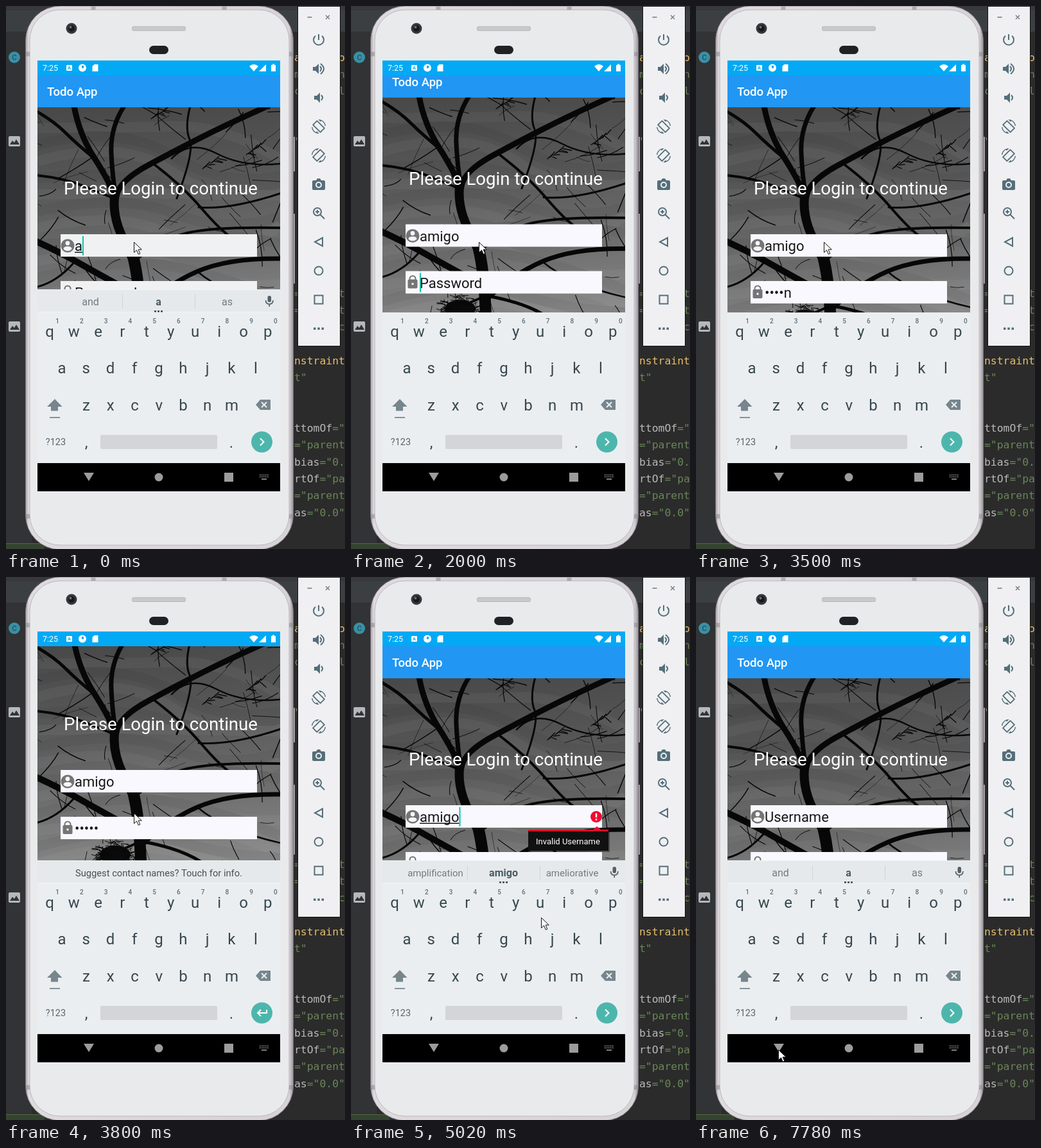
Animation of 528 by 847 pixels, one loop 8 s. Source, as an HTML page:

```html
<!DOCTYPE html>
<html lang="en">
<head>
<meta charset="utf-8">
<title>Todo App login</title>
<style>
html, body { margin: 0; width: 100%; height: 100%; overflow: hidden; background: #2b2b2b; }
svg { display: block; width: 528px; height: 847px; font-family: Roboto, sans-serif; }
text { white-space: pre; }
.mid { text-anchor: middle; }
.code { font: 16.4px "DejaVu Sans Mono", monospace; }
.line { fill: none; stroke: #546e7a; stroke-width: 2; }
.solid { fill: #546e7a; }
.twigs, .tree { fill: none; stroke: #070707; stroke-linecap: round; }
</style>
</head>
<body>
<svg viewBox="0 0 528 847">
  <defs>
    <linearGradient id="sky" x1="0" y1="0" x2="0.08" y2="1">
      <stop offset="0" stop-color="#484848"/><stop offset=".3" stop-color="#575757"/>
      <stop offset=".62" stop-color="#717171"/><stop offset="1" stop-color="#989898"/>
    </linearGradient>
    <linearGradient id="edge">
      <stop offset="0" stop-color="#a9a4a8"/><stop offset=".012" stop-color="#dedade"/>
      <stop offset=".985" stop-color="#d6d2d6"/><stop offset="1" stop-color="#969197"/>
    </linearGradient>
    <clipPath id="window"><rect x="49" y="107" width="378" height="371"/></clipPath>
    <clipPath id="photoClip"><rect x="49" y="158" width="378" height="430"/></clipPath>
  </defs>

  <g id="editor">
    <rect width="528" height="847" fill="#2b2b2b"/>
    <rect width="40" height="847" fill="#313335"/>
    <rect width="528" height="40" fill="#3c3f41"/>
    <rect width="528" height="7" fill="#37393b"/>
    <rect y="838" width="60" height="9" fill="#354431"/>
    <path d="M0 838.5H60" stroke="#52683f"/>
    <circle cx="13" cy="80" r="9" fill="#3a8fa5"/>
    <text x="13" y="84" class="mid" font-size="11" fill="#203c45">C</text>
    <g id="thumbs"></g>
    <g id="code" class="code"></g>
  </g>

  <g id="phone">
    <path d="M447 204h3v54h-3zM447 324h3v109h-3z" fill="#a5a1a6"/>
    <rect x="30.5" y="0" width="417" height="848" rx="54" fill="url(#edge)" stroke="#77737a"/>
    <rect x="37" y="6" width="404" height="835" rx="47" fill="#e9eaec" stroke="#bbb7bc"/>
    <path d="M31 75h6M441 75h6M31 796h6M441 796h6M136 1v5M340 1v5" stroke="#8d898e" stroke-width="7" opacity=".55"/>
    <circle cx="102" cy="35" r="8.5" fill="#36383b"/><circle cx="102" cy="35" r="5" fill="#17191c"/>
    <circle cx="100.500" cy="33" r="2" fill="#66717a"/>
    <rect x="196.500" y="32" width="83" height="6.500" rx="2" fill="#c8c9cb" stroke="#b9babc"/>
    <rect x="223" y="62" width="30" height="13" rx="6.500" fill="#202124"/>
  </g>

  <rect x="49" y="85" width="378" height="393" fill="#2196f3"/>
  <g clip-path="url(#window)">
    <g id="page">
      <g clip-path="url(#photoClip)">
        <rect x="49" y="158" width="378" height="430" fill="url(#sky)"/>
        <g id="clouds" fill="none" stroke-width="16" opacity=".04"></g>
        <g id="twigs" class="twigs"></g>
        <g id="tree" class="tree"></g>
        <ellipse cx="170" cy="488" rx="24" ry="14" fill="#0a0a0a"/>
        <g id="nest" class="twigs"></g>
      </g>
      <rect x="49" y="107" width="378" height="51" fill="#2196f3"/>
      <text x="64" y="140" font-size="18.600" font-weight="500" fill="#fff">Todo App</text>
      <text x="241" y="294" class="mid" font-size="27.600" fill="#fff">Please Login to continue</text>

      <rect class="field" x="85" y="356" width="306" height="35"/>
      <circle cx="96" cy="374" r="10.500" fill="#757575"/>
      <circle cx="96" cy="370" r="3.400" fill="#f6f6fa"/>
      <path d="M89.500 379q0-4 6.500-4t6.500 4q-2.500 3-6.500 3t-6.500-3z" fill="#f6f6fa"/>
      <text id="user" x="107" y="382" font-size="22" fill="#171717"></text>
      <rect id="underline" x="107" y="383.500" height="1.500" fill="#171717"/>

      <rect class="field" x="85" y="429" width="306" height="35"/>
      <path d="M91.500 443v-2a4.500 4.500 0 0 1 9 0v2" fill="none" stroke="#757575" stroke-width="2"/>
      <rect x="88.500" y="442" width="15" height="14" rx="2" fill="#757575"/>
      <circle cx="96" cy="449" r="1.800" fill="#f6f6fa"/>
      <text id="pass" x="107" y="455" font-size="22" fill="#171717"></text>
      <rect id="caret" width="2" height="30" fill="#0ac5ad"/>

      <rect x="174" y="515" width="129" height="34" rx="12" fill="#25543a" opacity=".7"/>
      <rect x="174" y="513" width="129" height="34" rx="12" fill="#40a562"/>
      <path d="M194 524v-3h16v19h-16v-3M188 530.500h14m-5-5l5 5-5 5" fill="none" stroke="#b9dfc5" stroke-width="2"/>
      <text x="253" y="535" class="mid" font-size="12.200" font-weight="500" letter-spacing="1.100" fill="#d9eee0">LOGIN</text>

      <g id="badge">
        <circle cx="382" cy="374" r="9" fill="#f30b2f"/>
        <path d="M382 368.500v6.500m0 2v2.500" stroke="#fff" stroke-width="2.500"/>
      </g>
      <g id="popup">
        <rect x="277" y="397" width="126" height="32" fill="#000" opacity=".35"/>
        <rect x="276" y="395" width="125" height="32" fill="#111"/>
        <path d="M276 394h101l6-5 6 5h12v2.500H276z" fill="#f30b2f"/>
        <text x="338" y="417" class="mid" font-size="13" fill="#fff">Invalid Username</text>
      </g>
    </g>
  </g>

  <g id="status" fill="#fff">
    <rect x="49" y="85" width="378" height="23" fill="#03a9f4"/>
    <text x="57" y="101" font-size="12.500">7:25</text>
    <rect x="94" y="92" width="9" height="9" rx="1"/>
    <path d="M96.500 99l2-5 2 5m-3.300-1.800h2.600" fill="none" stroke="#03a9f4"/>
    <circle cx="119" cy="96.500" r="6"/>
    <path d="M118 93h3v4h-3z" fill="#03a9f4"/>
    <path d="M137.500 91h6v11h-9v-8zM379 94q7-6 14 0l-7 8zM405 91v11h-11zM413 92h2v-1.500h3V92h2v10h-7z"/>
  </g>

  <g id="keyboard" fill="#37474f">
    <rect x="49" y="478" width="378" height="235" fill="#ebeef1"/>
    <g id="keys" class="mid" font-size="24"></g>
    <g fill="#77858d">
      <path d="M64 625l12-12 11.500 12H81v6.500H70V625zM68 641h16v1.800H68z"/>
      <path d="M396 614h15q1 0 1 1v14q0 1-1 1h-15l-7-8z"/>
    </g>
    <path d="M398 618l8 8m0-8l-8 8" stroke="#ebeef1" stroke-width="2"/>
    <text x="77.500" y="685" class="mid" font-size="14.500" fill="#56656d">?123</text>
    <rect x="147" y="669" width="182" height="22" rx="2" fill="#d3d5d7"/>
    <circle cx="398.500" cy="680" r="16.500" fill="#4db6ac"/>
    <path id="action" fill="none" stroke="#fff" stroke-width="2"/>
  </g>

  <g id="bar">
    <rect x="49" y="442" width="378" height="36" fill="#e6e9eb"/>
    <path d="M49 442.500h378M49 477.500h378" stroke="#f1f3f4"/>
    <g id="words" class="mid" fill="#6f7c83">
      <text x="131.500" y="467"></text>
      <text x="237.500" y="467" font-weight="700" fill="#455a64"></text>
      <text x="344.500" y="467"></text>
      <path d="M181.500 450v22M294.500 450v22" stroke="#d0d4d6"/>
      <path d="M231 475h3v2.500h-3zM236 475h3v2.500h-3zM241 475h3v2.500h-3z" fill="#37474f"/>
      <rect x="407.500" y="452" width="5.500" height="10" rx="2.700" fill="#546068"/>
      <path d="M404.500 459q0 6 5.700 6t5.700-6M410.200 465v4" fill="none" stroke="#546068" stroke-width="1.700"/>
    </g>
    <text id="hint" x="238" y="467" class="mid" font-size="14.700" fill="#455158">Suggest contact names? Touch for info.</text>
  </g>

  <g id="nav" fill="#9c9c9c">
    <rect x="49" y="713" width="378" height="44" fill="#000"/>
    <path d="M121 728h16l-8 13zM340 728h14v14h-14z"/>
    <circle cx="238" cy="735" r="6.500"/>
    <path d="M395 731.500h14M395 734.500h14" stroke="#aaa" stroke-width="1.500" stroke-dasharray="1.500 1.500"/>
    <path d="M398 738h8" stroke="#aaa" stroke-width="1.500"/>
  </g>

  <g id="tools">
    <rect x="454.500" y=".5" width="66" height="530" fill="#f0f0f2" stroke="#111"/>
    <path d="M469.500 17.500h7M498 14.500l6 6m0-6l-6 6" stroke="#6c777d" stroke-width="1.300"/>
  </g>
  <path id="pointer" d="M0 0V16L4 12.300 6.800 18.700 9.300 17.600 6.600 11.400H11.800z" fill="#fff" stroke="#111"/>
</svg>

<script>
const LOOP = 8000;
const $ = id => document.getElementById(id);
const add = (id, markup) => $(id).insertAdjacentHTML('beforeend', markup);

let seed = 41;
const random = (low, high) => {
  seed = (seed * 16807) % 2147483647;
  return low + (high - low) * seed / 2147483647;
};
const stroke = (d, width) => `<path d="${d}" stroke-width="${width}"/>`;

function drawEditor() {
  const green = '#6a8759', plain = '#bababa', yellow = '#e8bf6a';
  // row, colour, text, then an optional second colour and text
  const rows = [
    [0, yellow, 'a      o'], [1, green, 'm      n'], [2, green, 'c      l'],
    [5, green, '"'], [14, green, '=      t'], [15, green, '=      t'], [16, green, '       c'],
    [18, yellow, 'nstraint'], [19, green, 't"'], [22, plain, 'ttomOf', green, '="'],
    [23, green, '="parent'], [24, plain, 'bias', green, '="0.'],
    [25, plain, 'rtOf', green, '="pa'], [26, green, '="parent'], [27, plain, 'as', green, '="0.0"']
  ];
  for (const [row, color, text, nextColor, next = ''] of rows)
    add('code', `<text x="449" y="${85.5 + row * 26.3}" fill="${color}">${text}<tspan fill="${nextColor || color}">${next}</tspan></text>`);
  for (const y of [211, 500])
    add('thumbs', `<rect x="4" y="${y - 8}" width="18" height="16" rx="2" fill="#b5b9bc"/>
      <path d="M6 ${y + 5}l4-6 3 3 3-5 5 8z" fill="#313335"/>`);
}

function drawPhoto() {
  const limbs = [
    [9, 'M106 156Q114 200 137 236T168 294'],
    [7, 'M184 156Q162 190 164 230T171 294'],
    [9, 'M408 156Q350 182 310 202T222 248T172 298'],
    [14, 'M170 290Q164 325 182 362T203 410'],
    [18, 'M199 395Q207 430 209 478T220 590'],
    [10, 'M47 367Q82 383 112 400T206 452'],
    [5, 'M47 164Q75 180 93 198T138 238'],
    [4, 'M47 264Q90 268 124 282T168 300'],
    [3, 'M106 400Q80 430 49 438'],
    [7, 'M212 473Q250 435 298 414T428 394'],
    [4, 'M198 400Q240 364 282 354T428 346'],
    [4, 'M232 248Q274 280 304 315T350 360'],
    [3, 'M287 156Q278 190 286 208T266 300'],
    [2.5, 'M428 246Q370 252 328 230T258 238'],
    [3, 'M300 314Q350 318 428 292'],
    [5, 'M214 468Q270 478 305 500T350 565'],
    [4, 'M47 525Q100 515 135 500T204 470'],
    [2.5, 'M298 414Q340 450 428 470']
  ];
  for (const [width, d] of limbs) add('tree', stroke(d, width));

  for (let i = 0; i < 15; i++) {
    const y = 190 + i * 26;
    add('clouds', `<path d="M49 ${y}Q180 ${y - random(0, 40)} 260 ${y + random(-20, 25)}T427 ${y + random(-10, 50)}" stroke="${i % 2 ? '#000' : '#fff'}"/>`);
  }
  for (let i = 0; i < 90; i++) {
    const x = random(45, 430), y = random(150, 550);
    const angle = random(-2.9, 0.5), length = random(20, 65);
    const dx = Math.cos(angle) * length, dy = Math.sin(angle) * length;
    add('twigs', stroke(`M${x} ${y}q${dx / 2 + random(-6, 6)} ${dy / 2 + random(-5, 5)} ${dx} ${dy}`, random(0.4, 1.5)));
  }
  for (const [x, y] of [[240, 168], [388, 224], [320, 246]])
    for (let i = 0; i < 9; i++)
      add('twigs', stroke(`M${x - 14 + i * 3} ${y + 8 - i * 2}l${random(4, 14)} ${random(-10, 9)}`, 1.3));
  for (let i = 0; i < 130; i++) {
    const angle = random(0, 2 * Math.PI), reach = random(0.4, 1);
    const x = 170 + 34 * reach * Math.cos(angle), y = 487 + 21 * reach * Math.sin(angle);
    add('nest', stroke(`M${x} ${y}l${random(-13, 13)} ${random(-8, 8)}`, 1));
  }
}

function drawKeys() {
  const pitch = 37.75;
  [['qwertyuiop', 68, 515.5], ['asdfghjkl', 87, 573], ['zxcvbnm', 125, 631], [',', 125, 689], ['.', 351, 689]]
    .forEach(([letters, x, y]) => [...letters].forEach((letter, i) =>
      add('keys', `<text x="${x + i * pitch}" y="${y}">${letter}</text>`)));
  [...'1234567890'].forEach((digit, i) =>
    add('keys', `<text x="${80 + i * pitch}" y="495" font-size="10" font-weight="500" fill="#606e76">${digit}</text>`));
}

function drawTools() {
  const speaker = '<path class="solid" d="M-9-3h4l5-5v16l-5-5h-4z"/>';
  const rotate = `<g transform="translate(-11 -11) scale(.92)">
    <path class="line" d="M9.200 2.300L21.700 14.800 14.800 21.700 2.300 9.200z" stroke-linejoin="round"/>
    <path class="solid" d="M16.500 2.500c3.300 1.600 5.600 4.700 6 8.500H24C23.400 4.800 18.300 0 12 0h-.7l3.800 3.800zM7.500 21.500C4.200 20 1.900 16.800 1.500 13H0c.6 6.200 5.700 11 12 11h.7l-3.800-3.800z"/></g>`;
  const icons = [
    '<path class="line" d="M-5-6.500A8 8 0 1 0 5-6.500M0-9V0" stroke-width="2.500"/>',
    speaker + '<path class="line" d="M2-4Q6 0 2 4M3-8Q13 0 3 8"/>',
    `<g transform="translate(2)">${speaker}<path class="line" d="M2-4Q6 0 2 4"/></g>`,
    rotate,
    `<g transform="scale(-1 1)">${rotate}</g>`,
    '<path class="solid" d="M-8-6h4l2-3h4l2 3h4q2 0 2 2v11q0 2-2 2H-8q-2 0-2-2V-4q0-2 2-2z"/><circle cy="1" r="4" fill="#546e7a" stroke="#f0f0f2" stroke-width="2"/>',
    '<circle class="line" cx="-2" cy="-2" r="6"/><path class="line" d="M2.500 2.500L9 9M-5-2h6M-2-5v6"/>',
    '<path class="line" d="M6-6.500v13L-6 0z" stroke-width="1.600"/>',
    '<circle class="line" r="6.500"/>',
    '<rect class="line" x="-6.500" y="-6.500" width="13" height="13"/>',
    '<path class="solid" d="M-8-1.500h3.500v3.500H-8zM-1.700-1.500h3.500v3.500h-3.500zM4.500-1.500H8v3.500H4.500z"/>'
  ];
  icons.forEach((icon, i) => add('tools', `<g transform="translate(487 ${53 + i * 45})">${icon}</g>`));
}

const NEXT = 'M396 674.500l5.500 5.500-5.500 5.500';
const ENTER = 'M406 675v5H392m5-5l-5 5 5 5';
const SHORT = ['and', 'a', 'as'];
const LONG = ['amplification', 'amigo', 'ameliorative'];

// Each step holds until the next; unnamed values carry over.
const STEPS = [
  [0, { user: 'a', pass: 'Password', focus: 'user', caret: 1, scroll: 0, bar: 'words', words: SHORT,
        action: NEXT, popup: 0, badge: 0, field: '#f0f1f2', pointer: [199.500, 368.500] }],
  [150, { user: 'am' }],
  [300, { words: ['amp', 'am', 'among'] }],
  [450, { user: 'ami', words: ['amid', 'ami', 'amiss'] }],
  [760, { user: 'amig' }],
  [890, { words: LONG }],
  [1030, { user: 'amigo' }],
  [1690, { caret: 0 }],
  [2000, { focus: 'pass', caret: 1, scroll: 15.500, bar: '', field: '#f9f8ff' }],
  [2140, { scroll: 0 }],
  [2280, { pass: 'a' }],
  [2420, { pass: '•m' }],
  [2690, { pass: '••i' }],
  [2830, { pass: '•••g' }],
  [2970, { pass: '••••n' }],
  [3500, { caret: 0 }],
  [3650, { pass: '•••••' }],
  [3800, { focus: '', bar: 'hint', action: ENTER, scroll: 55 }],
  [3950, { scroll: 106 }],
  [4450, { scroll: 5, bar: 'words', action: NEXT, focus: 'user', caret: 1, badge: 1 }],
  [4600, { scroll: 0, popup: 1 }],
  [4740, { pointer: [225, 412] }],
  [4880, { pointer: [270, 490] }],
  [5020, { pointer: [296.500, 531.500] }],
  [5160, { pointer: [280, 575], caret: 0 }],
  [5310, { pointer: [230, 640] }],
  [5450, { pointer: [175, 700] }],
  [5590, { pointer: [140, 730] }],
  [5740, { pointer: [132, 736], caret: 1 }],
  [5870, { pointer: [128.500, 737.500] }],
  [6130, { caret: 0 }],
  [6690, { user: 'amig', caret: 1, popup: 0.45, badge: 0 }],
  [6820, { user: 'ami', popup: 0 }],
  [6960, { user: 'am' }],
  [7100, { user: 'a', words: SHORT }],
  [7230, { user: '' }],
  [7780, { caret: 0 }]
];
let current = {};
const timeline = STEPS.map(([start, change]) => [start, current = { ...current, ...change }]);

const show = (id, on) => $(id).style.display = on ? '' : 'none';

function render(state) {
  $('user').textContent = state.user || 'Username';
  $('pass').textContent = state.pass;
  const typed = { user: state.user, pass: state.pass === 'Password' ? '' : state.pass };
  const end = typed[state.focus] ? $(state.focus).getComputedTextLength() : 0;
  $('caret').setAttribute('x', 107 + end);
  $('caret').setAttribute('y', state.focus === 'pass' ? 432 : 359);
  show('caret', state.focus && state.caret);
  $('underline').setAttribute('width', state.focus === 'user' ? end : 0);

  $('page').setAttribute('transform', `translate(0 ${-state.scroll})`);
  document.querySelectorAll('.field').forEach(field => field.setAttribute('fill', state.field));
  show('bar', state.bar);
  show('words', state.bar === 'words');
  show('hint', state.bar === 'hint');
  document.querySelectorAll('#words text').forEach((label, i) => {
    label.textContent = state.words[i];
    label.setAttribute('font-size', state.words[i].length > 9 ? 15 : 16);
  });
  $('action').setAttribute('d', state.action);
  show('badge', state.badge);
  $('popup').setAttribute('opacity', state.popup);
  const scale = state.popup < 1 ? 0.935 : 1;
  $('popup').setAttribute('transform', `translate(338 411) scale(${scale}) translate(-338 -411)`);
  $('pointer').setAttribute('transform', `translate(${state.pointer})`);
}

drawEditor();
drawPhoto();
drawKeys();
drawTools();

let shown;
function tick() {
  const time = performance.now() % LOOP;
  const state = timeline.findLast(([start]) => start <= time)[1];
  if (state !== shown) render(shown = state);
  requestAnimationFrame(tick);
}
tick();
</script>
</body>
</html>
```
